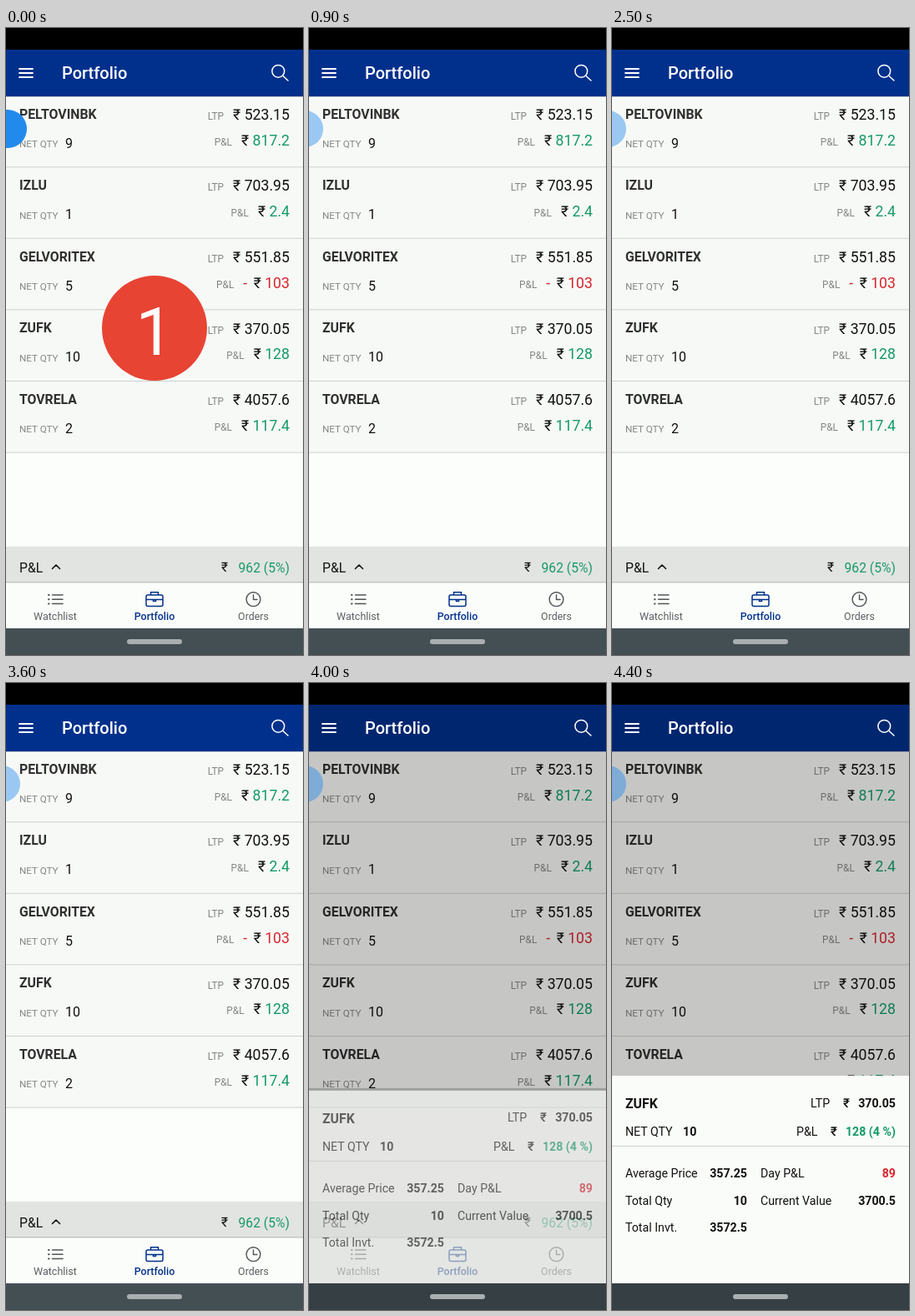
An HTML page for the animation above (8000 ms loop, 356 px wide and 752 px high).

```html
<!DOCTYPE html>
<html lang="en">
<head>
<meta charset="utf-8">
<title>Portfolio</title>
<style>
  html, body { margin: 0; width: 100%; height: 100%; overflow: hidden; background: #000; }
  svg { display: block; font-family: Roboto, "Noto Sans", sans-serif; }
  .line { fill: none; stroke-linecap: round; stroke-linejoin: round; }
</style>
</head>
<body>
<svg id="stage" width="356" height="752" viewBox="0 0 356 752"></svg>
<script>
const INK = '#111', GREY = '#858786', GREEN = '#159a68', RED = '#d8262f', BLUE = '#00308c';
const LOOP = 8000;

const esc = s => s.replace(/&/g, '&amp;');
const rect = (x, y, w, h, fill, rx = 0) =>
  `<rect x="${x}" y="${y}" width="${w}" height="${h}" rx="${rx}" fill="${fill}"/>`;
const line = (d, color, width) =>
  `<path class="line" d="${d}" stroke="${color}" stroke-width="${width}"/>`;
const text = (x, y, str, size, fill = INK, weight = 400, anchor = 'start') =>
  `<text x="${x}" y="${y}" font-size="${size}" fill="${fill}" font-weight="${weight}" text-anchor="${anchor}">${esc(str)}</text>`;

// Right-aligned "label  ₹ amount"
const money = (y, label, amount, color) => {
  const rupee = amount < 0
    ? `<tspan dx="11" fill="${RED}">- </tspan><tspan dx="3">₹ </tspan>`
    : '<tspan dx="11">₹ </tspan>';
  return `<text x="340" y="${y}" font-size="17.7" text-anchor="end" fill="${INK}">` +
    `<tspan font-size="11.9" fill="${GREY}">${esc(label)}</tspan>` +
    `${rupee}<tspan fill="${color}">${Math.abs(amount)}</tspan></text>`;
};

const holdings = [
  ['PELTOVINBK', 9, 523.15, 817.2],
  ['IZLU', 1, 703.95, 2.4],
  ['GELVORITEX', 5, 551.85, -103],
  ['ZUFK', 10, 370.05, 128],
  ['TOVRELA', 2, 4057.6, 117.4]
];

const holding = ([name, qty, price, gain], i) =>
  `<g transform="translate(0 ${i * 85.6})">` +
  text(16, 108.6, name, 15.8, '#303030', 700) +
  text(16, 143, 'NET QTY', 11.7, GREY) +
  text(71, 143.5, String(qty), 16) +
  money(109.8, 'LTP', price, INK) +
  money(140.6, 'P&L', gain, gain < 0 ? RED : GREEN) +
  rect(0, 166.2, 356, 1, '#cfd1d0') + '</g>';

const headerLabels =
  line('M16 49H32M16 54H32M16 59H32', '#fff', 1.8) +
  text(67, 61, 'Portfolio', 20, '#fff', 500) +
  '<circle cx="326.3" cy="51.8" r="7.4" fill="none" stroke="#fff" stroke-width="1.5"/>' +
  line('M331.8 57.2L338 63', '#fff', 1.5);

const totals =
  rect(0, 622, 356, 43, '#e2e4e1') +
  text(16, 652.5, 'P&L', 15.7) +
  line('M55.5 648.5L60 644L64.5 648.5', INK, 1.6) +
  text(258, 652, '₹', 15.7) +
  text(340, 652.5, '962 (5%)', 15.7, GREEN, 400, 'end');

const tabs =
  rect(0, 665, 356, 55, '#fbfdfa') + rect(0, 664, 356, 1.5, '#c3c5c3') +
  line('M55.5 680H68M55.5 685.2H68M55.5 690.4H68', '#505356', 1.5) +
  line('M51 680H51.6M51 685.2H51.6M51 690.4H51.6', '#505356', 2) +
  line('M170 680H186Q188 680 188 682V691.5Q188 693.5 186 693.5H170Q168 693.5 168 691.5V682Q168 680 170 680Z' +
    'M173.5 680V676.8H182.5V680M168 685.5H188M176.5 685.5V687.5H179.5V685.5', BLUE, 1.5) +
  '<circle cx="296.5" cy="685.2" r="8.4" fill="none" stroke="#505356" stroke-width="1.4"/>' +
  line('M296.5 680V685.5H301', '#505356', 1.4) +
  text(59, 709.5, 'Watchlist', 12.5, '#5c5f62', 400, 'middle') +
  text(178, 709.5, 'Portfolio', 12.4, BLUE, 500, 'middle') +
  text(296.5, 709.5, 'Orders', 12.4, '#5c5f62', 400, 'middle');

const bold = (x, y, str, color = INK, anchor = 'end') => text(x, y, str, 14.2, color, 700, anchor);
const plain = (x, y, str) => text(x, y, str, 14.2);
const sheet =
  rect(0, 471, 356, 249, '#fafcf9') +
  text(16, 510, 'ZUFK', 15.8, INK, 700) +
  plain(238, 508.5, 'LTP') + text(277, 508.5, '₹', 15, INK, 500) + bold(340, 508.5, '370.05') +
  plain(16, 543, 'NET QTY') + bold(85, 543, '10', INK, 'start') +
  plain(221, 543, 'P&L') + text(262, 543, '₹', 15, INK, 500) + bold(340, 543, '128 (4 %)', GREEN) +
  rect(0, 555, 356, 1, '#cfd1d0') +
  plain(16, 593, 'Average Price') + bold(162, 593, '357.25') +
  plain(178, 593, 'Day P&L') + bold(340, 593, '89', RED) +
  plain(16, 625.8, 'Total Qty') + bold(162, 625.8, '10') +
  plain(178, 625.8, 'Current Value') + bold(340, 625.8, '3700.5') +
  plain(16, 658.3, 'Total Invt.') + bold(162, 658.3, '3572.5');

// The nested svg clips the sheet at the system bar
const $ = id => document.getElementById(id);
$('stage').innerHTML =
  rect(0, 0, 356, 752, '#000') +
  rect(0, 82, 356, 428, '#f7f9f6') + rect(0, 510, 356, 112, '#fcfefb') +
  rect(0, 26, 356, 56, BLUE) + rect(0, 82, 356, 1, '#c4c8d0') +
  holdings.map(holding).join('') + totals + tabs +
  rect(0, 720, 356, 32, '#444f54') +
  `<g id="dim" opacity="0.2">${rect(0, 0, 356, 752, '#000')}</g>` +
  headerLabels + rect(145, 733, 66, 6, '#a9afb1', 3) +
  `<svg width="356" height="720" overflow="hidden"><g id="sheet">
    <g id="edge">${rect(0, 468, 356, 3, '#808280')}</g>${sheet}</g></svg>` +
  '<circle id="bubble" cy="121" fill="#228aec"/>' +
  '<g id="count"><circle cx="178" cy="360" r="63" fill="#e74434"/>' +
  text(178, 392, '1', 80, '#fff', 400, 'middle') + '</g>';

const clamp = v => Math.min(1, Math.max(0, v));
const ease = v => (1 - Math.cos(Math.PI * clamp(v))) / 2;
const show = (id, on) => $(id).setAttribute('visibility', on ? 'visible' : 'hidden');

function draw(t) {
  show('count', t < 100);

  // The floating button tucks itself into the edge and fades
  const tuck = ease((t - 200) / 700);
  $('bubble').setAttribute('cx', 2 - 7 * tuck);
  $('bubble').setAttribute('r', 23 - tuck);
  $('bubble').setAttribute('opacity', 1 - 0.56 * tuck);

  // Details slide up while fading in, with a shadowed edge until they settle
  const rise = ease((t - 3790) / 390);
  show('dim', t >= 3800);
  show('edge', rise < 1);
  $('sheet').setAttribute('transform', `translate(0 ${41 * (1 - rise)})`);
  $('sheet').setAttribute('opacity', rise);
}

const start = performance.now();
function tick() {
  draw((performance.now() - start) % LOOP);
  requestAnimationFrame(tick);
}
tick();
</script>
</body>
</html>
```
